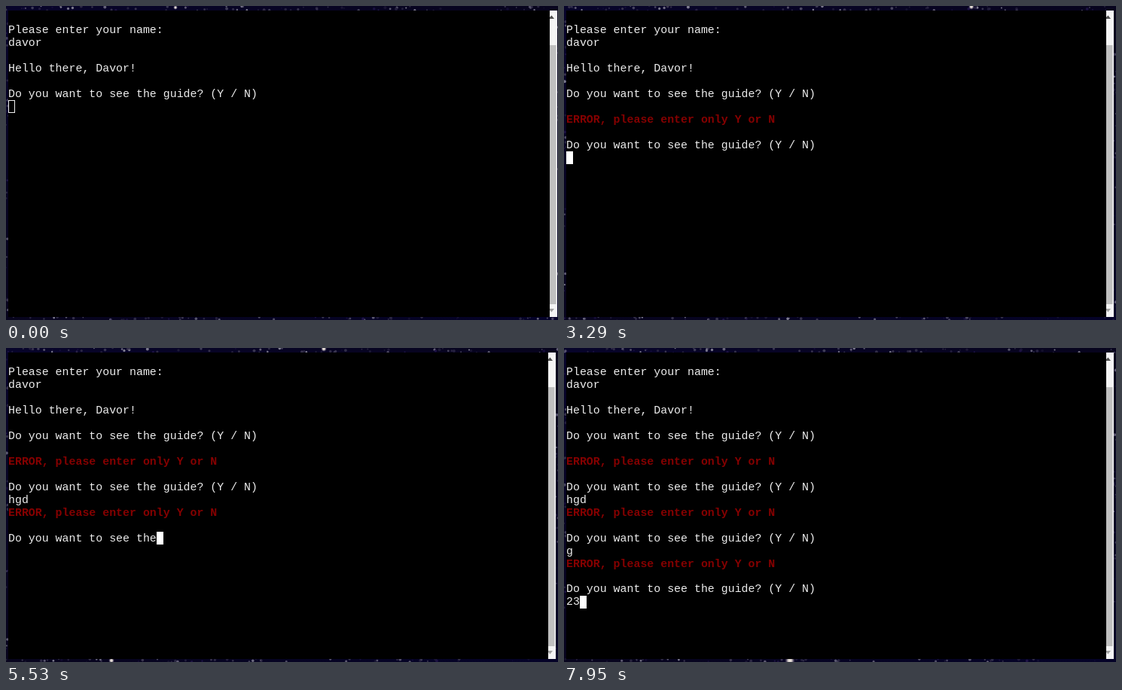
These frames come from a looping animation (733x417 px, 8 s). An HTML page:

```html
<!DOCTYPE html>
<html lang="en">
<head>
<meta charset="utf-8">
<title>Terminal prompt</title>
<style>
  html, body { margin: 0; width: 100%; height: 100%; overflow: hidden; background: #050220; }
  svg { display: block; width: 733px; height: 417px; }
  text { font: 14.92px "Courier New", "Liberation Mono", monospace; fill: #ececec; white-space: pre; }
  .error { fill: #850000; font-weight: bold; }
</style>
</head>
<body>
<svg viewBox="0 0 733 417" xmlns="http://www.w3.org/2000/svg">
  <defs>
    <linearGradient id="sky" x2="1" y2="1">
      <stop offset="0" stop-color="#07042a"/>
      <stop offset=".5" stop-color="#07041d"/>
      <stop offset="1" stop-color="#040228"/>
    </linearGradient>
    <radialGradient id="glow">
      <stop offset="0" stop-color="#fff8ea"/>
      <stop offset=".4" stop-color="#c8c0c0"/>
      <stop offset="1" stop-color="#554a70" stop-opacity="0"/>
    </radialGradient>
    <filter id="soft" filterUnits="userSpaceOnUse" x="0" y="0" width="733" height="417">
      <feGaussianBlur stdDeviation=".7"/>
    </filter>
  </defs>
  <rect width="733" height="417" fill="url(#sky)"/>
  <g id="stars" filter="url(#soft)"></g>
  <rect id="screen" x="3" y="6" width="717" height="407"/>
  <g id="scrollbar">
    <rect x="720" y="6" width="10" height="407" fill="#f4f4f4"/>
    <rect x="720" y="52" width="8.5" height="344" fill="#c0c0c0"/>
    <path d="M720 17v-2l2.5-2.5 3.5 4.5z" fill="#505050"/>
    <path d="M720 402v2l2.5 2.5 3.5-4.5z" fill="#a3a3a3"/>
  </g>
  <g id="lines"></g>
  <rect id="cursor"/>
</svg>
<script>
const LOOP = 8000, LEFT = 3, CELL = 8.95, LINE = 16.95, BASE = 36.3, CHAR_MS = 28, FOCUS = 1190;
const QUESTION = "Do you want to see the guide? (Y / N)";
const ERROR = "ERROR, please enter only Y or N";
const $ = id => document.getElementById(id);

function set(el, attrs) {
  for (const k in attrs) el.setAttribute(k, attrs[k]);
}
function add(parent, tag, attrs) {
  const el = document.createElementNS("http://www.w3.org/2000/svg", tag);
  set(el, attrs);
  return parent.appendChild(el);
}

// Bursts of evenly spaced picture updates: start, end, count
const bursts = [
  [0, 0, 1], [100, 860, 11], [950, 1020, 2], [1190, 1810, 9], [1960, 2740, 11],
  [2830, 3590, 11], [3680, 4440, 11], [4530, 5150, 9], [5300, 6080, 11],
  [6170, 6940, 11], [7030, 7810, 11], [7880, 7950, 2]
];
function snap(t) {
  const [start, end, count] = bursts.filter(b => b[0] <= t).pop();
  if (count < 2) return start;
  const step = (end - start) / (count - 1);
  return start + Math.min(count - 1, Math.floor((t - start) / step + 0.1)) * step;
}

// Each line: row, text, start time, time per character (0 = all at once)
const script = [
  [0, "Please enter your name:", 0, 0],
  [1, "davor", 0, 0],
  [3, "Hello there, Davor!", 0, 0],
  [5, QUESTION, 0, 0],
  [6, "", 0, 0],
  [7, ERROR, 2100, 0],
  [9, QUESTION, 2180, CHAR_MS],
  [10, "hgd", 4300, 150],
  [11, ERROR, 4850, 0],
  [13, QUESTION, 4932, CHAR_MS],
  [14, "g", 6250, 0],
  [15, ERROR, 6440, 0],
  [17, QUESTION, 6513, CHAR_MS],
  [18, "23", 7700, 180]
].map(([row, text, start, pace]) => ({
  row, text, start, pace,
  el: add($("lines"), "text", { x: LEFT, y: BASE + row * LINE, class: text === ERROR ? "error" : "" })
}));

function typed(line, t) {
  if (t < line.start) return "";
  return line.pace ? line.text.slice(0, Math.floor((t - line.start) / line.pace) + 1) : line.text;
}

let seed = 29;
const random = () => (seed = (seed * 16807) % 2147483647) / 2147483647;
const tints = ["#26213f", "#39344e", "#605c74", "#828093", "#201448"];

// Dim stars along the four visible edges
const dim = Array.from({ length: 170 }, (_, i) => {
  const edge = i < 75 ? 0 : i < 130 ? 1 : i < 150 ? 2 : 3;
  const star = { edge, along: random() * 733, across: random(), speed: 0.006 + random() * 0.012, phase: random() * 6.3 };
  star.el = add($("stars"), "circle", { r: 0.8 + random() * 1.2, fill: tints[Math.floor(random() * tints.length)] });
  return star;
});

// Bright stars drift slowly past an edge: x, y, time, radius
const bright = [
  [279, 415, 2210, 4], [541, 1, 3290, 4], [484, 414, 4670, 7], [422, 1, 5530, 4],
  [140, 415, 5530, 4], [308, 415, 6870, 3], [300, 415, 7950, 7], [225, 2, 0, 3]
].map(([x, y, time, r]) => ({ x, y, time, el: add($("stars"), "circle", { r, fill: "url(#glow)" }) }));

function drawStars(t) {
  for (const s of dim) {
    const go = s.along + t * s.speed;
    const [cx, cy] = [
      [go % 733, s.across * 6],
      [go % 733, 413 + s.across * 4],
      [s.across * 3, go % 417],
      [730 + s.across * 3, go % 417]
    ][s.edge];
    set(s.el, { cx, cy, opacity: 0.7 + 0.3 * Math.sin(t / 420 + s.phase) });
  }
  for (const s of bright) {
    const dt = t - s.time;
    set(s.el, { cx: s.x + dt * 0.008, cy: s.y + dt * 0.006, opacity: Math.max(0, 1 - Math.abs(dt) / 900) });
  }
}

function drawTerminal(t) {
  let last = script[0];
  for (const line of script) {
    line.el.textContent = typed(line, t);
    if (t >= line.start) last = line;
  }
  // A finished question or error moves the cursor down
  let row = last.row, column = typed(last, t).length;
  if (last.text === ERROR) { row += 2; column = 0; }
  if (last.text === QUESTION && column === QUESTION.length) { row++; column = 0; }

  const focused = t >= FOCUS, inset = focused ? 0 : 0.5;
  set($("cursor"), {
    x: Math.round(LEFT + column * CELL) + inset,
    y: Math.round(BASE + row * LINE - 12.9) + inset,
    width: 9 - 2 * inset, height: 17 - 2 * inset,
    fill: focused ? "#fff" : "none", stroke: focused ? "none" : "#f0f0f0"
  });
  const shift = focused ? 0 : 2;
  set($("screen"), { width: 717 + shift });
  set($("scrollbar"), { transform: `translate(${shift} 0)` });
}

function draw(time) {
  const t = snap(time % LOOP);
  drawStars(t);
  drawTerminal(t);
}

const begin = performance.now();
function tick() {
  draw(performance.now() - begin);
  requestAnimationFrame(tick);
}
tick();
</script>
</body>
</html>
```
